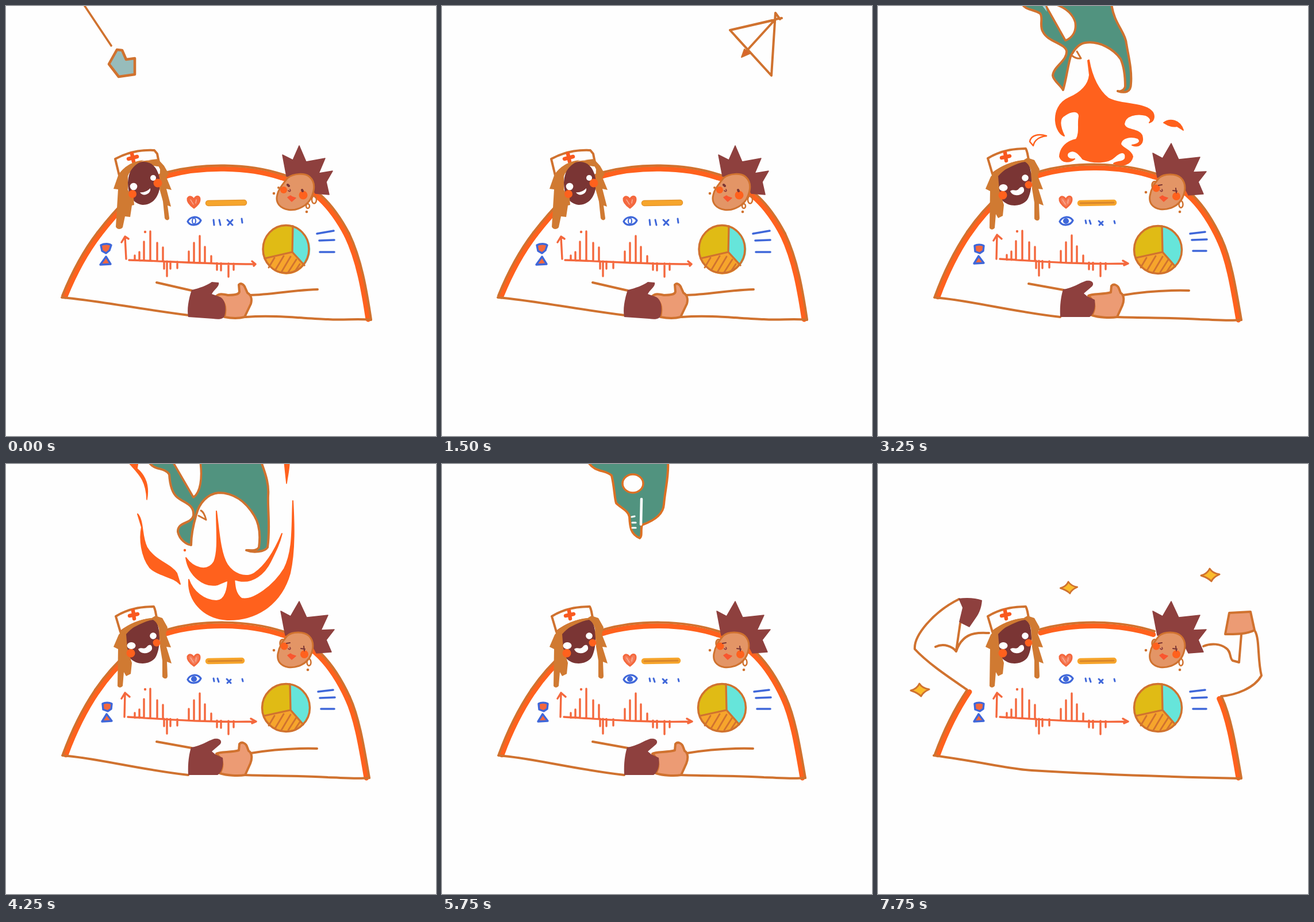
Recreate the animation shown at these times as an HTML page. Size 748x748 px, loop 8 s.

```html
<!DOCTYPE html>
<html lang="en">
<head>
<meta charset="utf-8">
<title>Shield of care</title>
<style>
html, body { margin: 0; width: 100%; height: 100%; overflow: hidden; background: #fefefe; }
svg { display: block; width: 100vw; height: 100vh; }
</style>
</head>
<body>
<svg id="stage" viewBox="0 0 748 748" fill="none" stroke-linecap="round" stroke-linejoin="round"></svg>
<script>
const STEP = 250, STEPS = 32;
const C = {
  line: '#d0722f', hot: '#ff611d', red: '#f4683d', dark: '#8e403e', face: '#7a3534',
  hair: '#d07a32', skin: '#ec9b74', tan: '#e39566', blue: '#3f67d9', gold: '#f6a52c',
  olive: '#e0bb15', teal: '#66e5da', green: '#51937f', stone: '#97bcbb', star: '#fbbc2c', white: '#fefefe'
};
const stage = document.getElementById('stage');

const path = (d, fill, stroke, w = 4) =>
  `<path d="${d}" fill="${fill || 'none'}"${stroke ? ` stroke="${stroke}" stroke-width="${w}"` : ''}/>`;
const ink = (d, color = C.line, w = 4) => path(d, '', color, w);
const oval = (x, y, rx, ry, fill, stroke, w = 3) =>
  `<ellipse cx="${x}" cy="${y}" rx="${rx}" ry="${ry}" fill="${fill || 'none'}"${stroke ? ` stroke="${stroke}" stroke-width="${w}"` : ''}/>`;
const dot = (x, y, r, fill) => oval(x, y, r, r, fill);

function layer(html, parent = stage) {
  const g = document.createElementNS('http://www.w3.org/2000/svg', 'g');
  g.innerHTML = html;
  parent.appendChild(g);
  return g;
}
const show = (g, on) => g.setAttribute('display', on ? 'inline' : 'none');
const move = (g, x, y, s = 1, cx = 0, cy = 0) =>
  g.setAttribute('transform', `translate(${x + cx * (1 - s)} ${y + cy * (1 - s)}) scale(${s})`);

// Thin brown rim with the hot band just inside it
const rim = d => `<g transform="translate(368 548) scale(.981 .978) translate(-368 -548)">${ink(d, C.hot, 9)}</g>` + ink(d, C.line, 4);

const arcs = [
  {
    ends: ['M98 504 C115 462 133 428 159 394', 'M597 396 C618 440 627 492 635 545'],
    mids: ['M159 394 C193 350 238 301 281 289', 'M481 293 C538 309 570 345 597 396'],
    top: 'M281 289 C340 273 420 273 481 293'
  },
  {
    ends: ['M99 505 C114 464 130 430 155 393', 'M598 405 C615 442 623 494 632 546'],
    mids: ['M155 393 C188 345 235 301 281 288', 'M481 291 C535 305 570 345 598 405'],
    top: 'M281 288 C340 271 420 271 481 291'
  }
];

function handshake(v) {
  const brown = [
    'M323 494 C336 491 350 486 358 480 L370 481 C372 488 361 494 358 501 L372 506 C383 511 383 529 380 539 C378 546 368 545 360 544 L317 541 C314 525 319 506 323 494Z',
    'M322 493 C340 490 350 482 362 478 C373 476 377 483 372 488 L358 500 L364 505 L377 511 C379 525 375 537 368 541 L317 541 C316 522 318 506 322 493Z'
  ][v];
  const light = [
    'M364 507 C369 499 378 501 386 503 C397 503 405 502 406 497 L405 485 C408 481 414 484 416 490 L420 499 C427 503 428 511 426 518 L415 541 C404 544 390 543 380 541 C383 525 383 512 364 507Z',
    'M366 504 C372 500 392 502 405 498 L406 487 C410 482 417 486 419 491 L422 499 C429 503 428 514 425 521 L416 541 C404 543 384 542 372 538 C379 525 378 515 366 504Z'
  ][v];
  return ink(['M97 507 C150 511 225 526 318 538 M417 541 C470 537 520 544 560 545 C590 547 610 543 635 546',
              'M98 507 C155 511 235 532 317 541 M415 541 C470 543 520 542 560 545 C590 546 610 548 632 546'][v])
    + ink(['M262 481 L323 495 M424 503 C462 502 500 494 542 493',
           'M262 483 L323 494 M426 503 C462 497 500 494 541 495'][v])
    + path(light, C.skin, C.line, 4) + path(brown, C.dark);
}

function nurse(v) {
  const cap = ['M198 299 L190 266 C210 255 235 250 258 251 L263 257 L266 272 C240 267 215 274 198 299Z',
               'M199 292 L191 265 C210 253 235 248 257 248 C261 255 260 262 263 270 C240 270 218 277 199 292Z'][v];
  const crown = ['M201 300 C214 280 238 270 264 275', 'M202 294 C220 279 244 270 264 272'][v];
  const left = ['M240 268 C216 270 201 284 195 295 L187 318 L195 319 L191 384 C193 389 200 389 203 385 L207 366 L216 367 L219 347 L223 346 L222 334 L212 320 L212 296 C218 280 230 272 240 268Z',
                'M240 271 C218 278 203 288 196 297 L187 318 L195 322 L194 386 C196 390 201 389 203 386 L205 362 L209 369 L217 365 L219 346 L211 320 L209 296 C218 286 230 278 240 271Z'][v];
  const right = ['M248 268 C258 270 264 275 268 284 L267 318 L273 340 L276 369 C278 374 284 373 284 369 L281 347 L287 349 L279 318 L288 320 L279 298 L283 292 L275 278 L264 266Z',
                 'M250 270 C258 270 263 276 266 286 L268 318 L272 342 L272 370 C275 375 281 374 281 369 L280 344 L288 347 L279 318 L287 319 L278 296 L281 284 L272 268 L260 264Z'][v];
  const face = ['M239 271 C258 270 268 290 268 310 C267 332 255 346 238 346 C219 344 212 326 212 307 C213 288 222 272 239 271Z',
                'M207 291 C225 284 245 270 260 271 C269 284 270 322 259 338 C247 351 226 349 216 338 C207 325 206 306 207 291Z'][v];
  const smile = ['M233 324 C239 325 246 322 251 317 C253 327 238 333 233 324Z',
                 'M230 322 C236 318 240 323 244 319 C249 312 255 314 254 322 C250 331 234 332 230 322Z'][v];
  return path(cap, C.white, C.line, 4)
    + ink(['M213 266 L228 262 M219 257 L222 271', 'M215 264 L229 261 M221 255 L223 269'][v], '#f9591f', 6.5)
    + ink(crown, C.hair, 8)
    + path(face, C.face) + path(left, C.hair) + path(right, C.hair)
    + (v ? dot(217, 329, 7.5, C.hot) + dot(262, 311, 6.5, C.hot) + oval(218, 316, 7.5, 6, C.white) + dot(256, 299, 5.8, C.white)
         : dot(220, 327, 7, C.hot) + dot(264, 308, 7.5, C.hot) + dot(222, 314, 6.3, C.white) + dot(256, 299, 5, C.white))
    + path(smile, C.white);
}

function friend(v) {
  const hair = ['M488 296 L481 259 L499 268 L510 243 L522 271 L555 265 L544 291 L568 287 L557 306 L562 328 L538 326 L525 302Z',
                'M486 298 L478 256 L495 265 L510 239 L523 267 L560 263 L548 289 L571 288 L557 306 L566 327 L540 329 L526 302Z'][v];
  const head = ['M490 299 C500 291 520 290 528 297 C538 306 537 319 532 331 C526 347 508 356 492 354.500 C476 352 469 342 471.500 330 C473 320 480 312 490 299Z',
                'M489 299 C498 291 518 291 527 299 C536 308 535 321 530 333 C523 348 507 355 491 353.500 C477 351 471 342 473 330 C475 318 480 310 489 299Z'][v];
  return path(hair, C.dark, C.dark, 1.5)
    + (v ? oval(481, 312, 4.5, 7, C.tan, C.line, 2.5) : oval(536, 337, 4, 6.5, '', C.line, 2.5))
    + path(head, C.tan, C.line, 3)
    + (v ? dot(484, 317, 6.5, C.hot) + dot(519, 331, 7, C.hot) + oval(527, 345, 3.5, 6, '', C.line, 2.5)
         : dot(483, 320, 6, C.hot) + dot(517, 329, 7.5, C.hot) + oval(525, 348, 3, 4, '', C.line, 2.5))
    + ink(v ? 'M488 312 L494 311 M513 321 L520 322 M518 317 L519 325' : 'M490 311 L492 313 M515 320 L516 322', C.face, v ? 2 : 4)
    + ink('M491 321 C493 324 496 322 494 319', C.dark, 1.8)
    + path('M490 333 L495 330 L498 332 L504 334 L497 340Z', '#f9562f', '#f9562f', 1.5)
    + dot(466, v ? 324 : 326, 2.3, C.line) + dot(v ? 525 : 523, 358, 2.3, C.line) + (v ? '' : dot(474, 316, 2, C.line));
}

// x and tip of each bar; tips below the axis hang down
const bars = [[224, 434], [232, 428], [240, 410], [251, 392], [263, 412], [273, 420], [275, 457], [280, 470], [286, 457], [298, 456],
  [318, 427], [327, 412], [337, 400], [346, 419], [357, 435], [367, 459], [374, 460], [387, 471], [396, 459]];

function chart(v) {
  const base = x => 442 - v + (x - 212) * .034;
  let d = v ? 'M206 440 L207 398 M201 408 L207 398 L215 405 M212 440 C270 443 340 450 434 448 M426 443 L435 448 L428 451'
            : 'M209 440 L207 402 M201 411 L207 401 L213 405 M214 442 C270 443 340 449 432 449 M428 444 L434 449 L431 452';
  for (const [x, y] of bars) d += `M${x} ${base(x)}L${x} ${y - v}`;
  return ink(d, C.red, 3.4) + dot(242, 393 - v, 2.2, C.red);
}

function pie(v) {
  const cx = v ? 495 : 498, rx = v ? 41.5 : 40, n = v ? 424 : 423;
  const a = v ? '494 383' : '499 383', b = v ? '449 438' : '450 439', c = v ? '517 453' : '519 451';
  const arc = (from, to, f) => path(`M${cx} 428 L${from} A${rx} 41.5 0 0 1 ${to}Z`, f);
  return arc(b, a, C.olive) + arc(a, c, C.teal) + arc(c, b, C.gold)
    + ink('M457 455 L467 438 M468 460 L483 435 M479 463 L495 436 M491 463 L505 441 M503 461 L511 449', C.line, 2.8)
    + ink(`M${cx} 428 L${a} M${cx} 428 L${b} M${cx} 428 L${c}`, C.line, 3.3)
    + oval(487, n, rx, 41.5, '', C.line, 3.5);
}

function panel(v) {
  const cup = ['M165 416 C171 413 179 413 183 416 L180 425 L174 430 L167 426Z',
               'M168 417 C173 414 180 415 184 417 L183 426 L177 430 L169 427Z'][v];
  const cone = ['M174 436 L182 449 L164 450Z', 'M175 435 L184 447 L167 448Z'][v];
  const end = v ? 410 : 414;
  return path('M327 351 C320 346 315 341 316 335 C319 329 324 332 327 337 C330 329 337 330 337 336 C337 343 332 347 327 351Z', v ? '#f47d5b' : '#f46a43', C.red, 3)
    + ink('M321 337 L326 345 M331 337 L330 343', '#fbb59d', 1.4)
    + ink(`M352 343 L${end} 342`, v ? C.gold : '#e3922b', 10.5) + ink(`M352 343 L${end} 342`, v ? '#d9862a' : C.gold, v ? 3 : 8)
    + path('M316 375 C320 366 333 364 339 373 C335 382 321 384 316 375Z', '', C.blue, 3.2)
    + oval(327, 374, v ? 4 : 3, v ? 4 : 5, v ? C.blue : '', C.blue, 2.2)
    + ink(v ? 'M361 373 L362 378 M368 373 L370 379 M384 374 L391 381 M391 375 L385 381 M411 374 L412 378'
            : 'M361 372 L362 381 M371 372 L373 381 M385 372 L394 381 M394 372 L386 381 M410 370 L411 377', C.blue, 3)
    + path(cup, C.red, C.blue, 3.4) + path(cone, C.red, C.blue, 3.4)
    + chart(v) + pie(v)
    + ink(v ? 'M543 396 L569 393 M546 407 L572 406 M548 426 L571 426'
            : 'M541 396 L570 391 M545 408 L571 407 M546 428 L571 428', C.blue, 3.6);
}

const bases = arcs.map((a, v) => {
  const root = layer('');
  layer(a.ends.map(rim).join('') + rim(a.top), root);
  const mids = layer(a.mids.map(rim).join(''), root);
  const hands = layer(handshake(v), root);
  layer(panel(v) + nurse(v) + friend(v), root);
  return { root, calm: [mids, hands] };
});

const flex = layer(
  ink('M97 507 C180 518 230 531 268 533 C380 540 500 544 632 547')
  + ink('M154 392 C128 374 88 348 64 322 C62 299 95 258 141 235 M100 318 C115 311 130 318 136 326 C142 308 152 298 168 295 C178 293 187 294 193 294 M143 277 L136 325')
  + path('M140 234 C155 232 170 233 181 237 C180 250 176 260 170 268 L159 284 L141 275 L147 250Z', C.dark)
  + ink('M656 291 C664 305 660 340 667 368 C655 390 622 402 597 404 M566 317 C580 311 596 313 605 320 C615 326 611 338 617 342 L628 345 L632 297')
  + path('M611 259 L648 257 L655 289 C640 297 618 296 604 296Z', C.skin, C.line, 4));

const stars = [[332, 215, .92], [578, 193, 1], [73, 393, 1]].map(([x, y, s]) => ({
  x, y, s, g: layer(path('M-16 1 Q-5 -2 -1 -11 Q4 -3 16 -1 Q5 4 2 11 Q-4 5 -16 1Z', C.star, C.line, 3))
}));

const stone = layer(ink('M125 -18 L183 69', C.line, 3.6));
layer(path('M179 101 L193 76 L202 77 L209 93 L224 91 L224 119 L196 123Z', C.stone, C.line, 4.6), stone);

const plane = layer(ink('M574 25 L501 42 L573 121 L580 12 L588 23 M529 79 L580 23 L591 21 M501 42 L580 24')
  + path('M526 75 L537 82 L521 89Z', '#d9652a', C.line, 2));

const burst = layer(
  path('M365 95 L368 120 C366 140 350 152 332 160 C314 168 308 185 309 200 C310 215 318 224 324 226 C316 210 314 195 325 190 C335 183 350 180 350 192 C347 205 352 220 345 232 C330 235 317 245 316 262 C320 274 335 272 342 266 C335 268 326 264 330 256 C340 246 350 258 356 266 C375 274 400 274 412 262 C425 250 432 255 430 265 C428 272 415 270 410 274 C425 280 440 276 443 262 C440 250 425 248 422 240 C424 228 440 226 452 230 C458 235 455 240 442 242 C455 247 463 238 459 225 C452 212 430 218 428 205 C430 190 450 186 466 190 C476 195 475 200 472 203 C482 200 482 188 475 182 C460 168 420 172 400 160 C385 148 372 125 367 94Z', C.hot, C.hot, 2)
  + ink('M293 226 C280 222 266 224 264 236 L270 243 C272 235 277 228 293 226', C.hot, 2.5)
  + path('M497 203 C508 195 525 198 531 216 L520 209 C512 211 503 207 497 203Z', C.hot, C.hot, 2));

const blaze = layer(
  path('M318 201 C316 235 340 268 385 271 C440 272 480 240 494 190 C503 150 501 100 499 64 C497 110 500 150 484 182 C466 212 430 238 410 234 C398 226 398 210 397 198 L386 200 C386 215 382 238 366 238 C345 238 325 222 318 201Z', C.hot, C.hot, 2)
  + path('M313 163 C318 195 345 215 368 210 C380 205 392 198 405 203 C430 208 450 190 460 170 C470 150 476 138 480 121 C470 145 455 175 432 190 C415 200 395 190 385 175 C372 155 370 110 366 82 C366 115 370 150 362 170 C350 190 325 180 313 163Z', C.hot, C.hot, 2)
  + path('M229 87 C240 100 235 125 245 145 C258 168 288 175 297 190 L303 209 C290 195 265 195 250 180 C235 160 232 130 236 110Z', C.hot, C.hot, 2)
  + path('M212 -4 C228 15 244 25 245 62 C250 35 240 18 228 8 L230 -4Z M484 -4 L488 34 C490 20 493 8 493 -4Z', C.hot, C.hot, 1.5)
  + dot(311, 150, 2.2, C.hot));

const beast = (body, gap, tooth) => layer(path(body, C.green, C.line) + path(gap, C.white, C.line, 3.6) + path(tooth, C.white, C.line, 3));
const jaws = [
  beast('M250 -4 C258 8 270 5 282 13 C288 20 280 35 287 45 C295 62 325 65 328 78 C330 95 305 105 304 121 C305 130 318 138 322 146 C328 125 330 105 335 88 C340 78 348 66 360 64 C385 60 410 75 422 92 C430 110 430 130 430 140 C428 148 420 149 417 148 C430 152 440 150 440 135 C442 110 435 85 432 65 C430 45 410 30 406 -4Z',
    'M290 -4 L326 60 C337 56 346 45 343 28 C338 12 325 2 305 -4Z', 'M337 86 C342 90 348 92 353 91 L346 79'),
  beast('M248 -4 C258 12 275 5 284 18 C285 35 288 50 298 58 C310 68 328 70 326 90 C322 105 298 100 299 118 C302 132 314 140 322 141 C322 125 326 105 331 88 C336 68 350 52 370 50 C400 50 420 70 432 90 C443 108 442 130 440 145 C436 152 425 150 418 150 C430 155 450 153 455 145 C460 110 455 80 456 55 C458 30 448 10 444 -4Z',
    'M290 -4 L326 58 C338 50 342 25 338 -4Z', 'M335 90 L348 97 C346 88 342 82 339 81')
];
jaws[0].innerHTML += path('M283 -4 L294 10 L290 -4Z', '#a8d4d8');
const shut = layer(
  path('M254 -4 C265 15 285 10 295 20 C300 40 300 60 303 68 C312 77 325 82 326 92 C327 110 328 122 344 129 C349 125 345 115 348 106 C365 100 385 90 386 70 C388 45 395 20 393 -4Z', C.green, '#dc7024')
  + oval(332, 34, 18, 16, C.white, '#dc7024', 3.5)
  + ink('M347 61 L346 105', C.white, 4.5) + ink('M330 92 L335 91 M331 102 L337 102 M331 111 L337 111', C.white, 3.2));

const fall = [[0, 0], [48, 72], [88, 136], [62, -10]];
const flight = [[-110, 120], [-55, 60], [0, 0], [42, -78]];
const dive = { 9: -90, 10: -40, 11: 0, 20: 0, 21: 4, 22: 4, 23: 0, 24: -75 };

function place(g, spot) {
  show(g, !!spot);
  if (spot) move(g, ...spot);
}

function draw(n) {
  const up = n >= 29;
  bases.forEach((b, v) => {
    show(b.root, n % 2 === v);
    b.calm.forEach(g => show(g, !up));
  });
  show(flex, up);
  for (const s of stars) {
    show(s.g, up);
    move(s.g, s.x, s.y, s.s * (n % 2 ? 1 : .8));
  }
  place(stone, fall[n]);
  place(plane, flight[n - 4]);
  place(shut, n in dive && [0, dive[n]]);
  show(jaws[0], n >= 12 && n <= 15 || n === 19);
  show(jaws[1], n >= 16 && n <= 18);
  place(burst, n >= 12 && n <= 15 && [0, 0, n === 12 ? .7 : n % 2 ? 1 : .95, 368, n === 12 ? 95 : 272]);
  place(blaze, n >= 16 && n <= 18 && [0, 0, n % 2 ? 1 : .96, 380, 271]);
}

let last = -1;
function tick() {
  const n = Math.floor(performance.now() / STEP) % STEPS;
  if (n !== last) draw(last = n);
  requestAnimationFrame(tick);
}
tick();
</script>
</body>
</html>
```
